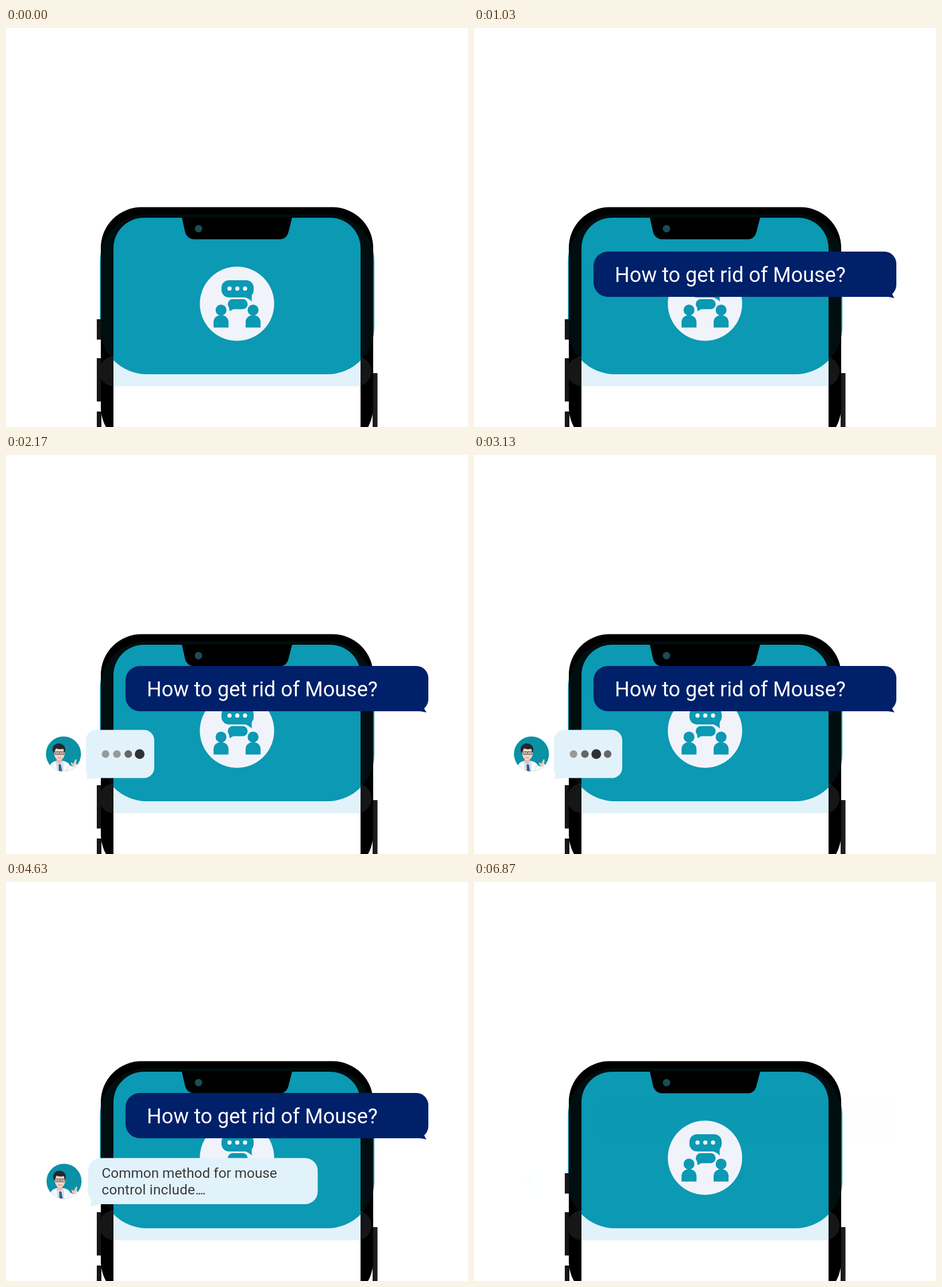
An HTML page with a canvas that plays this animation: 804x696 px, repeating every 7.03 s.

```html
<!DOCTYPE html>
<html lang="en">
<head>
<meta charset="utf-8">
<title>Phone chat</title>
<style>
html, body { margin: 0; width: 100%; height: 100%; overflow: hidden; background: #fff; }
canvas { display: block; width: 804px; height: 696px; }
</style>
</head>
<body>
<canvas id="stage" width="804" height="696"></canvas>
<script>
const ctx = document.getElementById('stage').getContext('2d');
const LOOP = 7030, STEP = 1000 / 30;
const TEAL = '#0b99b3', NAVY = '#00206a', PALE = '#e2f2fa', ICON_BG = '#f0f4fa';

const progress = (t, start, end) => Math.min(1, Math.max(0, (t - start) / (end - start)));
const easeInOut = p => (1 - Math.cos(Math.PI * p)) / 2;
const fade = p => Math.min(1, 2 * p);

function fillBox(x, y, w, h, r, color) {
  ctx.fillStyle = color;
  ctx.beginPath();
  ctx.roundRect(x, y, w, h, r);
  ctx.fill();
}

function fillOval(x, y, rx, ry, color) {
  ctx.fillStyle = color;
  ctx.beginPath();
  ctx.ellipse(x, y, rx, ry, 0, 0, 2 * Math.PI);
  ctx.fill();
}

const disc = (x, y, r, color) => fillOval(x, y, r, r, color);

function fillPath(d, color) {
  ctx.fillStyle = color;
  ctx.fill(new Path2D(d));
}

function strokePath(d, color, width) {
  ctx.strokeStyle = color;
  ctx.lineWidth = width;
  ctx.stroke(new Path2D(d));
}

function label(text, x, y, size, color, spacing = 0) {
  ctx.font = `${size}px Roboto, sans-serif`;
  ctx.letterSpacing = `${spacing}px`;
  ctx.fillStyle = color;
  ctx.fillText(text, x, y);
}

const bodyPath = new Path2D();
bodyPath.roundRect(165, 312.5, 474, 420, 71);
bodyPath.roundRect(187, 331, 430, 420, [53, 53, 0, 0]);

function drawPanels() {
  fillBox(162, 573, 474, 52, 26, PALE);
  fillBox(163.5, 325, 477.5, 279, 82, TEAL);
}

function drawPerson(x) {
  disc(x, 492, 9.5, TEAL);
  fillBox(x - 13, 501, 26, 21.5, [12, 12, 0, 0], TEAL);
}

function drawChatIcon() {
  disc(402, 481, 64.7, ICON_BG);
  fillBox(375, 440, 56, 30, 13, TEAL);
  fillPath('M412 468 Q421 471 428 477 Q427 472 428 464 Z', TEAL);
  for (const x of [389, 402.5, 416]) disc(x, 454.5, 3.7, ICON_BG);
  fillBox(386, 473, 34.5, 17.5, 8.5, TEAL);
  fillPath('M388 485 L389 494 L398 489 Z', TEAL);
  drawPerson(374.2);
  drawPerson(430);
}

function drawPhone() {
  drawPanels();
  ctx.fillStyle = '#fff';
  ctx.fillRect(187, 625, 430, 71);

  ctx.fillStyle = '#161616';
  ctx.fillRect(158, 508, 8, 35.5);
  ctx.fillRect(158, 576, 8, 75.5);
  ctx.fillRect(158, 669, 8, 27);
  ctx.fillStyle = '#1c1c1c';
  ctx.fillRect(638, 602, 8.5, 94);

  ctx.fillStyle = '#000';
  ctx.fill(bodyPath, 'evenodd');
  ctx.save();
  ctx.clip(bodyPath, 'evenodd');
  ctx.globalAlpha = 0.09;
  drawPanels();
  ctx.restore();

  fillPath('M306 330.5 L311 353 Q314 368 327 368.5 H477 Q489 368 492 354 L498 330.5 Z', '#000');
  disc(335, 350, 6.5, '#1b4c57');
  drawChatIcon();
}

function drawQuestion(y) {
  ctx.save();
  ctx.translate(0, y);
  fillBox(208, 0, 527, 79, [25, 21, 21, 25], NAVY);
  fillPath('M712 78.5 Q723 78.5 732 81 Q728 77 727 70 Z', NAVY);
  label('How to get rid of Mouse?', 245, 52.5, 36, '#fff');
  ctx.restore();
}

function drawAvatar(x, y) {
  ctx.save();
  ctx.translate(x, y);
  ctx.beginPath();
  ctx.arc(0, 0, 30.5, 0, 2 * Math.PI);
  ctx.fillStyle = '#0a91a6';
  ctx.fill();
  ctx.clip();

  fillPath('M-25 32 L-23 19 Q-21 14 -13 12 L-1 12 Q9 14 11 20 L16 22 L21 16 L25 20 Q22 30 15 32 Z', '#f8fafc');
  fillPath('M14 20 L13 14 L17 17 L21 9 L23 10 L22 17 L20 22 Z', '#f4c8b8');
  fillPath('M-12 8 H-3 V14 L-6 19 L-12 14 Z', '#efb9a8');
  fillPath('M-12 14 L-7 18 L-2 14 L0 32 H-11 Z', '#dce8f5');
  fillPath('M-8.500 18 H-4.500 L-2 32 H-8 Z', '#3c5c91');
  strokePath('M-13 13 L-9 31 M-1 13 L-1 31', '#b9c5d4', 1);
  strokePath('M-20 21 L-17 31 M9 20 L6 31', '#c8d3df', 0.8);

  fillOval(-8, -8, 11, 10.5, '#25262f');
  fillOval(-7, -1, 9.2, 11.5, '#f8d4c5');
  fillPath('M-18 -3 Q-19 -15 -8 -17 Q3 -17 3 -4 L1 -3 L0 -9 Q-8 -7 -13 -10 L-16 -3 Z', '#25262f');
  ctx.strokeStyle = '#514a52';
  ctx.lineWidth = 1;
  for (const eye of [-11, -2.8]) {
    ctx.strokeRect(eye - 3.2, -4, 6.4, 5);
    disc(eye, -1.4, 1, '#35343b');
  }
  strokePath('M-10 6 Q-7 8 -4 6', '#c9747a', 1.2);
  ctx.restore();
}

function drawTyping(t) {
  fillBox(139, 479.5, 119, 84, 18, PALE);
  fillPath('M139.5 548 Q142 560 140 565 Q150 565 160 563 Z', PALE);
  drawAvatar(100, 521.5);
  const cycle = Math.floor((t - 1210) / 240 + 0.01);
  const phase = ((cycle % 6) + 6) % 6;
  const active = phase < 4 ? phase : 6 - phase;
  for (let i = 0; i < 4; i++) {
    const gap = Math.abs(i - active);
    disc(173.2 + i * 19.8, 521.7, gap ? 6.6 : 8.5, ['#303132', '#666', '#999'][Math.min(gap, 2)]);
  }
}

function drawAnswer() {
  fillBox(143, 481.5, 399.5, 80.5, 22, PALE);
  fillPath('M147 548 Q150 560 146 566 Q156 565 167 560 Z', PALE);
  drawAvatar(101, 522);
  label('Common method for mouse', 166.5, 516, 24.3, '#3a3a3c');
  label('control include', 166.5, 544.5, 24.3, '#3a3a3c', 0.2);
  label('....', 329.5, 544.5, 24.3, '#3a3a3c', -2.4);
}

// Replies never show below the bottom edge of their own box.
function drawReply(entry, exit, draw) {
  ctx.save();
  ctx.beginPath();
  ctx.rect(0, 0, 804, 566);
  ctx.clip();
  ctx.globalAlpha = fade(entry) * fade(1 - exit);
  ctx.translate(0, 6 * (1 - entry + exit));
  draw();
  ctx.restore();
}

function drawFrame(t) {
  ctx.clearRect(0, 0, 804, 696);
  drawPhone();

  const ending = progress(t, 6537, 6867);
  const questionIn = progress(t, 0, 500);
  const typingIn = progress(t, 1237, 1767);
  const lift = easeInOut(progress(t, 800, 1100));

  ctx.globalAlpha = fade(questionIn) * fade(1 - ending);
  drawQuestion(511 + 6 * (1 - questionIn) - 137 * lift - 6 * typingIn + 6 * ending);
  ctx.globalAlpha = 1;

  if (t < 4000) drawReply(typingIn, progress(t, 3600, 3930), () => drawTyping(t));
  else drawReply(progress(t, 4100, 4630), ending, drawAnswer);
}

function tick() {
  const t = performance.now() % LOOP;
  drawFrame(Math.floor((t + 4) / STEP) * STEP);
  requestAnimationFrame(tick);
}
tick();
</script>
</body>
</html>
```
